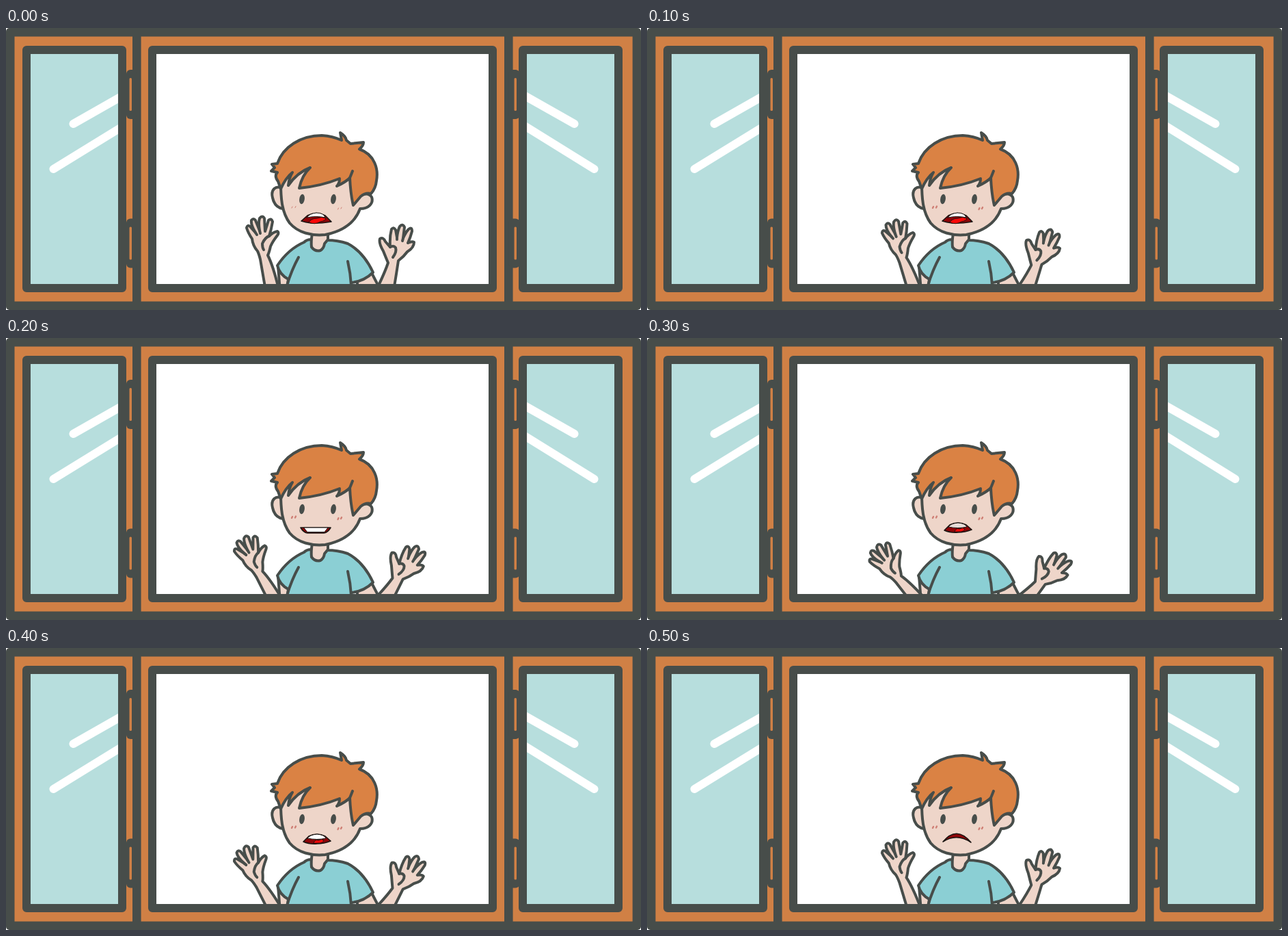
Write an HTML page that moves like this. It is 929 by 412 pixels and loops after 0.6 s.

```html
<!DOCTYPE html>
<html lang="en">
<head>
<meta charset="utf-8">
<title>Boy at the window</title>
<style>
  html, body { margin: 0; width: 100%; height: 100%; overflow: hidden; background: #fff; }
  svg { display: block; width: 100%; height: 100%; }
  .wood { fill: #d08045; }
  .dark { fill: #474d4a; }
  .glass { fill: #b7dedd; }
  .glint { fill: none; stroke: #fff; stroke-width: 12; stroke-linecap: round; }
  .sash { fill: none; stroke: #474d4a; stroke-width: 12; stroke-linejoin: round; }
  #boy { stroke: #474d4a; stroke-width: 4; stroke-linejoin: round; stroke-linecap: round; }
  .skin { fill: #eed5c9; }
  .hair { fill: #da8244; }
  .shirt { fill: #8bcfd4; }
  .line { fill: none; }
  .eye { fill: #474d4a; stroke: none; }
  #blush { fill: none; stroke: #cf8076; }
  #mouths { stroke: #1b1512; stroke-width: 1.6; color: #fff; }
  .cave { fill: #8e0508; }
  .teeth { fill: currentColor; stroke-width: 1; }
  .tongue { fill: #f80808; stroke-width: 1; }
</style>
</head>
<body>
<svg viewBox="0 0 929 412" preserveAspectRatio="none">
  <defs>
    <clipPath id="opening"><path d="M214 32H712V380H214Z"/></clipPath>
    <g id="hinge">
      <rect class="dark" x="176" y="61" width="16" height="72" rx="6"/>
      <rect class="wood" x="180.500" y="73" width="3.500" height="48" rx="1.500"/>
    </g>
    <g id="ohMouth">
      <path class="cave" d="M435 283L443 275Q455 269 467 275L475 282Q465 286 455 286Q444 287 435 283Z"/>
      <path class="teeth" d="M441 278Q444 273 455 272Q466 273 468 278Q455 281 441 278Z"/>
      <path class="tongue" d="M450 285Q452 279 457 281Q462 278 465 281Q465 284 460 285Z"/>
    </g>
  </defs>

  <rect class="dark" width="929" height="412" rx="5"/>
  <path class="wood" d="M12.500 12.500H185V399.600H12.500ZM197.600 12.500H729V399.600H197.600ZM741.600 12.500H916.600V399.600H741.600Z"/>
  <path class="glass" d="M30 32H170V380H30ZM756 32H896V380H756Z"/>
  <path class="glint" d="M98.500 140L168 100.500M69.500 206L168 145.500M831.500 140L758 98.500M860.500 206L758 142.500"/>
  <path fill="#fff" d="M214 32H712V380H214Z"/>

  <g clip-path="url(#opening)">
    <g id="boy">
      <path class="skin" d="M398 348L401 385H420L416 360Z"/>
      <path class="skin" d="M512 362L516 385H549L534 356Z"/>

      <g id="leftArm">
        <path class="skin" d="M381 390L372 338Q370 330 368 326Q361 318 360 308Q354 299 352 292
          Q353 287 357 290L365 299Q358 288 359 281Q362 277 365 281L371 296Q369 284 371 278
          Q375 273 378 278L379 297Q382 288 384 281Q388 277 390 283Q388 295 385 304
          Q391 298 397 297Q400 299 397 303Q390 312 387 319Q385 328 383 332Q392 350 401 390"/>
        <path class="line" d="M385 304Q379 306 375 315Q375 321 377 324M365 299L367 302M371 296L372 300"/>
      </g>
      <g id="rightArm">
        <path class="skin" d="M538 390L546 374Q555 355 559 343Q556 336 552 326Q545 314 547 308
          Q552 305 555 312L562 320Q561 305 564 294Q567 290 570 295L572 306Q573 296 576 290
          Q580 285 583 291L581 307Q585 298 589 294Q594 290 594 297Q592 305 588 314
          Q594 311 597 313Q597 321 587 327Q582 334 574 340Q571 360 566 390"/>
        <path class="line" d="M562 320Q567 317 570 321Q572 327 566 335M572 306V309M581 307L580 311"/>
      </g>

      <path class="shirt" d="M446 309Q440 309 436 313Q413 323 397 347Q400 360 413 367L410 387H506L505 372
        Q524 370 537 357Q523 327 500 315Q485 310 470 310Z"/>
      <path class="line" d="M428 335Q418 353 411 376M500 341Q504 358 505 376"/>
      <path class="skin" d="M448 300Q446 312 447 320Q452 327 460 325Q465 322 466 315L471 309V300"/>

      <path class="skin" d="M406 235C394 228 387 237 390 248Q393 262 405 264"/>
      <path class="skin" d="M402 226C402 251 404 270 415 285C427 299 447 304 467 302
        C491 297 510 286 518 264C531 264 538 256 535 247C529 238 516 243 509 257L504 210L430 200Z"/>
      <path class="hair" d="M402 235L398 224Q392 216 397 211L388 209L393 204L389 199L397 198
        C405 174 431 157 462 157Q478 158 491 164L489 153Q497 158 498 164L504 169Q514 168 523 167
        Q523 172 517 177C540 185 545 207 542 223Q541 234 534 242Q526 240 519 246L508 259
        Q504 242 503 219Q497 225 484 231Q488 227 488 220Q461 231 429 234Q433 215 445 204
        Q426 211 413 230Q414 219 419 211Q409 219 402 235Z"/>
      <path class="line" d="M503 219L507 209"/>

      <ellipse class="eye" cx="433" cy="250" rx="3.800" ry="7.200" transform="rotate(8 433 250)"/>
      <ellipse class="eye" cx="479" cy="250" rx="3.800" ry="7.200" transform="rotate(8 479 250)"/>
      <path id="blush" d="M418 263L419 261M423 262.500L424 260.500M485.500 265L486.500 263M490 264L491 262"/>

      <g id="mouths">
        <g>
          <path class="cave" d="M432 282L441 274Q454 267 467 274L476 283Q457 286 446 285Q438 284 432 282Z"/>
          <path class="teeth" d="M440 277Q444 271 454 270Q465 270 467 277Q454 274 440 277Z"/>
          <path class="tongue" d="M443 284Q446 278 455 278Q462 275 468 278Q467 282 460 283Q452 288 443 284Z"/>
        </g>
        <g>
          <path class="cave" d="M431 277H475Q471 284 465 285H441Q435 284 431 277Z"/>
          <path class="teeth" d="M436 277H471L466 283.500H441Z"/>
        </g>
        <use href="#ohMouth" y="-2" color="#e8dfda"/>
        <use href="#ohMouth"/>
        <path class="cave" d="M433 283Q453 259 474 284Q453 270 433 283Z"/>
      </g>
    </g>
  </g>

  <rect class="sash" x="30" y="32" width="140" height="348"/>
  <rect class="sash" x="214" y="32" width="498" height="348"/>
  <rect class="sash" x="756" y="32" width="140" height="348"/>
  <use href="#hinge"/>
  <use href="#hinge" y="217.500"/>
  <use href="#hinge" transform="translate(927.500 0) scale(-1 1)"/>
  <use href="#hinge" transform="translate(927.500 217.500) scale(-1 1)"/>
</svg>
<script>
  const STEP = 100;
  const swing = [0, 1, 2, 3, 2, 1];
  const talk = [0, 0, 1, 2, 3, 4];
  // Angle of each arm per swing position.
  const leftTurn = [0, -7, -17, -28];
  const rightTurn = [0, 8, 17.5, 27];

  const byId = id => document.getElementById(id);
  const leftArm = byId("leftArm"), rightArm = byId("rightArm"), blush = byId("blush");
  const mouths = [...byId("mouths").children];

  function draw(time) {
    const beat = Math.floor(time / STEP) % swing.length;
    const pose = swing[beat];
    leftArm.setAttribute("transform", `rotate(${leftTurn[pose]} 409 362)`);
    rightArm.setAttribute("transform", `rotate(${rightTurn[pose]} 537 368)`);
    blush.setAttribute("stroke-width", beat ? 2.4 : 1);
    mouths.forEach((mouth, i) => mouth.setAttribute("display", i === talk[beat] ? "inline" : "none"));
  }

  const start = performance.now();
  function tick() {
    draw(performance.now() - start);
    requestAnimationFrame(tick);
  }
  draw(0);
  requestAnimationFrame(tick);
</script>
</body>
</html>
```
